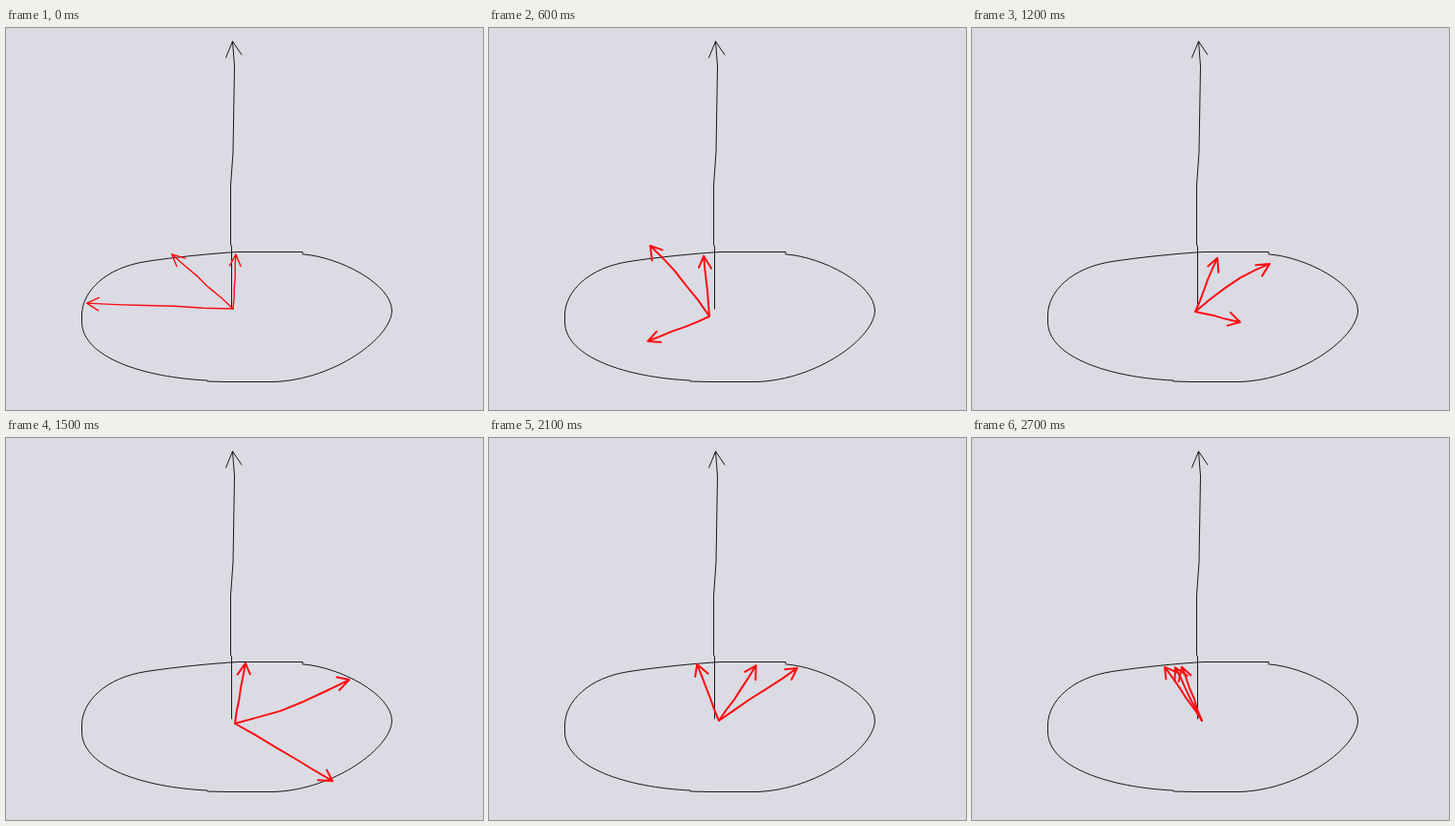
Recreate the animation shown at these times as an HTML page. Size 500 by 400 pixels, loop 3.15 s.

```html
<!DOCTYPE html>
<html lang="en">
<head>
<meta charset="utf-8">
<title>Rotating vectors</title>
<style>
  html, body { margin: 0; width: 100%; height: 100%; overflow: hidden; background: #dbdbe3; }
  svg { display: block; width: 100%; height: 100%; }
  path { fill: none; stroke-linejoin: round; stroke-linecap: round; }
  .ink { stroke: #181818; stroke-width: 1; }
  .pose { visibility: hidden; stroke: #fc0d12; stroke-width: 2; animation: show 3.15s step-end infinite; }
  .pose:first-child { stroke-width: 1.4; }
  .pose:last-child { animation-name: show-long; }
  @keyframes show { 0% { visibility: visible; } 4.7619%, 100% { visibility: hidden; } }
  @keyframes show-long { 0% { visibility: visible; } 14.2857%, 100% { visibility: hidden; } }
</style>
</head>
<body>
<svg viewBox="0 0 500 400" xmlns="http://www.w3.org/2000/svg">
  <g class="ink">
    <path d="M312 237C350 240 404 268 404.500 296C404 324 345 368 281 370.500H231L211 370V369C145 366 80 345 79.500 308V300C80 276 104 251 147 244.500C176 240 217 236 243 234.500H311V237"/>
    <path d="M236.500 294V229L235.500 227V165L238 130 239.500 40 237.500 14M230.500 31L237.500 14 247 28"/>
  </g>
  <g id="poses"></g>
</svg>
<script>
const STEP = 150, STEPS = 19;
const DISC = { x: 242, y: 303, rx: 163, ry: 68 };

// Common start of the arrows: step, x, y.
const root = [[0, 238, 294], [2, 236, 299], [4, 231, 302], [8, 234, 297], [10, 240, 299], [14, 241, 296]];

// Tips on the disc: step, angle in degrees, radius (1 = rim), sag of the shaft.
const tips = [
  [[0, 167.2, .99], [2, 223.7, 1.04], [3, 235, 1.04], [4, 218.3, .59], [6, 98, .27],
   [8, -17, .25], [10, -53.3, 1.03], [14, 61.4, 1.04], [17, 98.3, .94]],
  [[0, 113.3, 1.06, 0], [2, 130.6, 1.05, 7], [3, 141.4, 1.06, 0], [4, 112.1, 1.19, -4], [8, 62.5, .93, -5],
   [9, 35.3, 1.04, 0], [10, 45.4, 1.03, 5], [14, 76.3, .98, 2], [17, 100.9, .94, 0]],
  [[0, 90.4, .97], [2, 98.7, .97], [4, 96.3, .95], [8, 84.2, .92], [10, 86.8, .99],
   [14, 98.6, .98], [17, 104.8, .96]]
];

function tween(keys, step) {
  const next = keys.findIndex(key => key[0] > step);
  if (next < 0) return keys[keys.length - 1].slice(1);
  const a = keys[next - 1], b = keys[next];
  const k = (step - a[0]) / (b[0] - a[0]);
  return a.slice(1).map((v, i) => v + (b[i + 1] - v) * k);
}

let seed = 7;
function jitter(size) {
  seed = seed * 16807 % 2147483647;
  return (seed / 2147483647 - .5) * size;
}

const point = (x, y) => x.toFixed(1) + ' ' + y.toFixed(1);

// A shaft with a slightly shaky hand, then two wings.
function arrow(x, y, tx, ty, sag) {
  const back = Math.atan2(y - ty, x - tx);
  let shaft = 'M' + point(x, y);
  for (let k = .2; k < .9; k += .2) {
    shaft += 'L' + point(x + (tx - x) * k + jitter(1.2),
                         y + (ty - y) * k + sag * Math.sin(k * Math.PI) + jitter(1.2));
  }
  const wing = side => {
    const angle = back + side * .5 + jitter(.15), size = 14 + jitter(3);
    return point(tx + size * Math.cos(angle), ty + size * Math.sin(angle));
  };
  const tip = point(tx, ty);
  return `<path d="${shaft}L${tip}M${wing(-1)}L${tip} ${wing(1)}"/>`;
}

function pose(step) {
  const [x, y] = tween(root, step);
  return tips.map(keys => {
    const [degrees, radius, sag = 0] = tween(keys, step);
    const angle = degrees * Math.PI / 180;
    return arrow(x, y,
      DISC.x + DISC.rx * radius * Math.cos(angle),
      DISC.y - DISC.ry * radius * Math.sin(angle), sag);
  }).join('');
}

let markup = '';
for (let step = 0; step < STEPS; step++) {
  markup += `<g class="pose" style="animation-delay:${step * STEP}ms">${pose(step)}</g>`;
}
document.getElementById('poses').innerHTML = markup;
</script>
</body>
</html>
```
